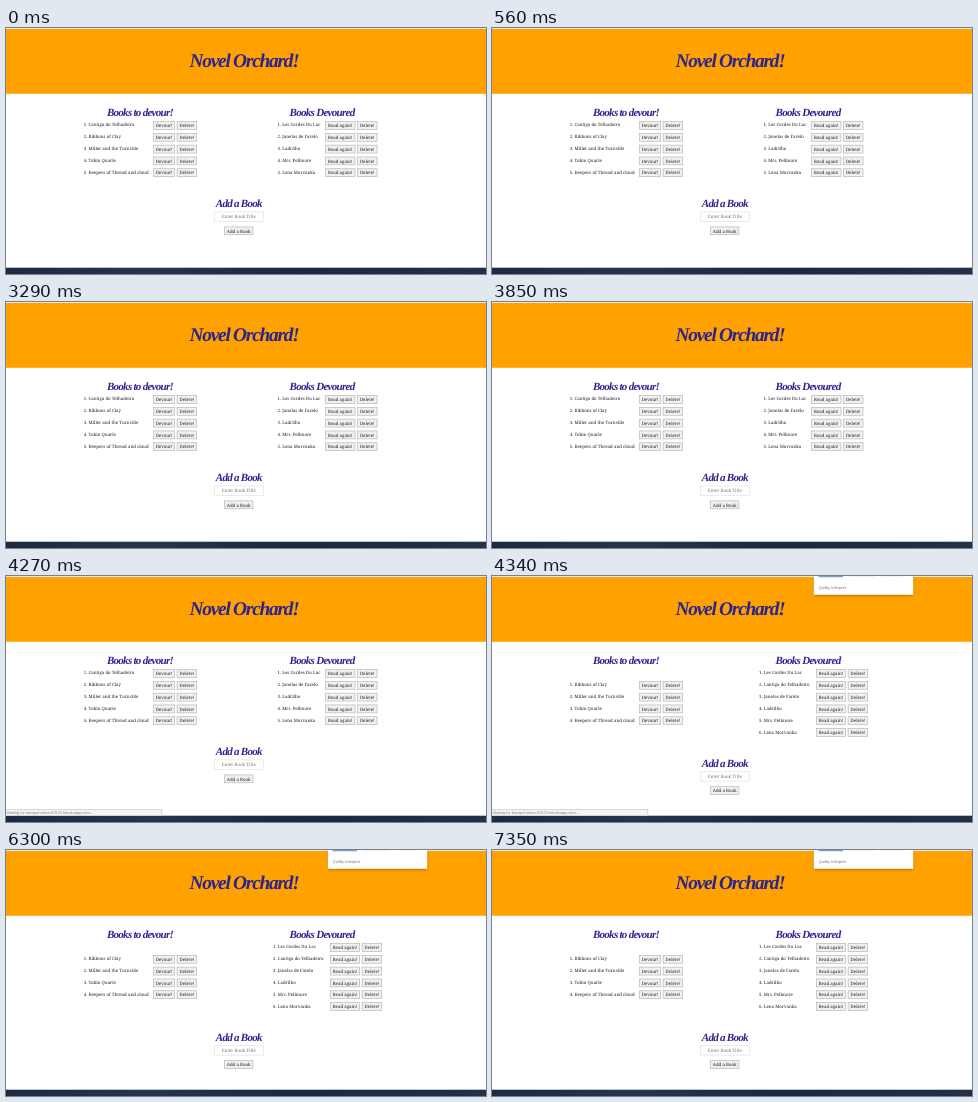
These frames come from a looping animation (480x246 px, 7420 ms). An HTML page with a canvas:

```html
<!DOCTYPE html>
<html lang="en">
<head>
<meta charset="utf-8">
<title>Reading list</title>
<style>
html, body { margin: 0; width: 100%; height: 100%; overflow: hidden; background: #fff; }
canvas { display: block; width: 100%; height: 100%; }
</style>
</head>
<body>
<canvas id="stage"></canvas>
<script>
const W = 480, H = 246, LOOP = 7420;
const PRESS = 3710, RELEASE = 3850, STATUS_IN = 4060, MOVE = 4340, FADE = 4690, STEP = 70;
const SERIF = '"Noto Serif", serif';
const SANS = '"Liberation Sans", Arial, sans-serif';
const SCRIPT = '"Liberation Serif", "Times New Roman", serif';
const INK = '#25252a', BLUE = '#2c2391', ORANGE = '#ffa200';
const ROW_TOP = 93.2, ROW = 11.82;

const toRead = [
  'Cantiga do Telhadeiro', 'Ribbons of Clay', 'Miller and the Turnstile',
  'Tobin Quarle', 'Keepers of Thread and cloud'
];
const done = [
  'Les Cordes Du Lac', 'Janelas de Farelo', 'Ladrilho',
  'Mrs. Pellmore', 'Lena Morvanka'
];
const doneAfter = [done[0], toRead[0], ...done.slice(1)];

const canvas = document.getElementById('stage');
const ctx = canvas.getContext('2d');
const ratio = window.devicePixelRatio || 1;
canvas.width = Math.round(W * ratio);
canvas.height = Math.round(H * ratio);

function rect(x, y, w, h, fill) {
  ctx.fillStyle = fill;
  ctx.fillRect(x, y, w, h);
}

function frame(x, y, w, h, line) {
  ctx.strokeStyle = line;
  ctx.lineWidth = 0.6;
  ctx.strokeRect(x + 0.3, y + 0.3, w - 0.6, h - 0.6);
}

function text(str, x, y, font, color = INK, align = 'left') {
  ctx.font = font;
  ctx.fillStyle = color;
  ctx.textAlign = align;
  ctx.fillText(str, x, y);
}

// Tight tracking gives the headings their joined, script-like rhythm.
function heading(str, x, y, size) {
  ctx.letterSpacing = -0.065 * size + 'px';
  text(str, x, y, `italic bold ${size}px ${SCRIPT}`, BLUE, 'center');
  ctx.letterSpacing = '0px';
}

function button(label, x, y, w, pressed = false) {
  rect(x, y, w, 8.5, pressed ? '#dedede' : '#f0f0f0');
  frame(x, y, w, 8.5, '#b2b2b2');
  text(label, x + w / 2, y + 5.9, `4.4px ${SERIF}`, INK, 'center');
}

function list(items, x, top, action, actionX, actionW, pressFirst = false) {
  items.forEach((name, i) => {
    const y = top + i * ROW;
    text(`${i + 1}.`, x, y + 5.2, `4.4px ${SERIF}`);
    text(name, x + 4.7, y + 5.2, `4.4px ${SERIF}`);
    button(action, actionX, y, actionW, pressFirst && i === 0);
    button('Delete!', actionX + actionW + 1.8, y, 20.2);
  });
}

function page(moved, pressed) {
  rect(0, 0, W, H, '#fff');
  rect(0, 0, W, 1, '#ececec');
  rect(0, 1, W, 64.8, ORANGE);
  heading('Novel Orchard!', 238, 38.8, 19.4);
  heading('Books to devour!', 134, 88.3, 11);
  heading('Books Devoured', 316, 88.3, 11);

  if (moved) {
    list(toRead.slice(1), 77.8, ROW_TOP + ROW, 'Devour!', 147.2, 21.8);
    list(doneAfter, 267, ROW_TOP, 'Read again!', 324, 30);
  } else {
    list(toRead, 77.8, ROW_TOP, 'Devour!', 147.2, 21.8, pressed);
    list(done, 271.5, ROW_TOP, 'Read again!', 319.3, 30);
  }
}

function form(dy) {
  frame(208.3, 183.6 + dy, 49.4, 10, '#dedede');
  text('Enter Book Title', 232.8, 190.1 + dy, `4.45px ${SERIF}`, '#77777b', 'center');
  heading('Add a Book', 232.8, 179.3 + dy, 11);
  button('Add a Book', 218.2, 198.6 + dy, 29);
}

function footer() {
  const g = ctx.createLinearGradient(0, 0, W, 0);
  g.addColorStop(0, '#1d2b42');
  g.addColorStop(0.3, '#25354c');
  g.addColorStop(0.6, '#1b2940');
  g.addColorStop(1, '#223148');
  rect(0, 239.7, W, H - 239.7, g);
}

function status(alpha) {
  if (alpha <= 0) return;
  ctx.globalAlpha = alpha;
  rect(0, 233.3, 156, 6.6, '#f4f4f4');
  frame(-1, 233.3, 157.2, 6.6, '#c4c4c4');
  text('Waiting for tranquil-sierra-07870.herokuapp.com...', 87, 238,
    `3.9px ${SANS}`, '#858585', 'right');
  ctx.globalAlpha = 1;
}

function popup() {
  ctx.save();
  ctx.shadowColor = 'rgba(0, 0, 0, 0.4)';
  ctx.shadowBlur = 3 * ratio;
  ctx.shadowOffsetY = 0.8 * ratio;
  rect(321.8, -4, 99.4, 22.8, '#fff');
  ctx.restore();
  rect(326.5, 0.2, 24.5, 1, '#5c86bd');
  rect(357, 0.2, 26, 0.6, '#e6e6e6');
  rect(390, 0.2, 20, 0.6, '#ededed');
  text('Quilby Interpret', 326.6, 13.2, `4px ${SANS}`, '#77777b');
}

function statusAlpha(t) {
  if (t < STATUS_IN) return 0;
  if (t < FADE) return 1;
  return 1 - (Math.floor((t - FADE) / STEP) + 1) / 4;
}

function draw(now) {
  const t = now % LOOP;
  const moved = t >= MOVE;
  ctx.setTransform(ratio, 0, 0, ratio, 0, 0);
  ctx.textRendering = 'geometricPrecision';
  page(moved, t >= PRESS && t < RELEASE);
  form(moved ? ROW : 0);
  footer();
  status(statusAlpha(t));
  if (moved) popup();
}

const start = performance.now();
function tick() {
  draw(performance.now() - start);
  requestAnimationFrame(tick);
}
tick();
</script>
</body>
</html>
```
